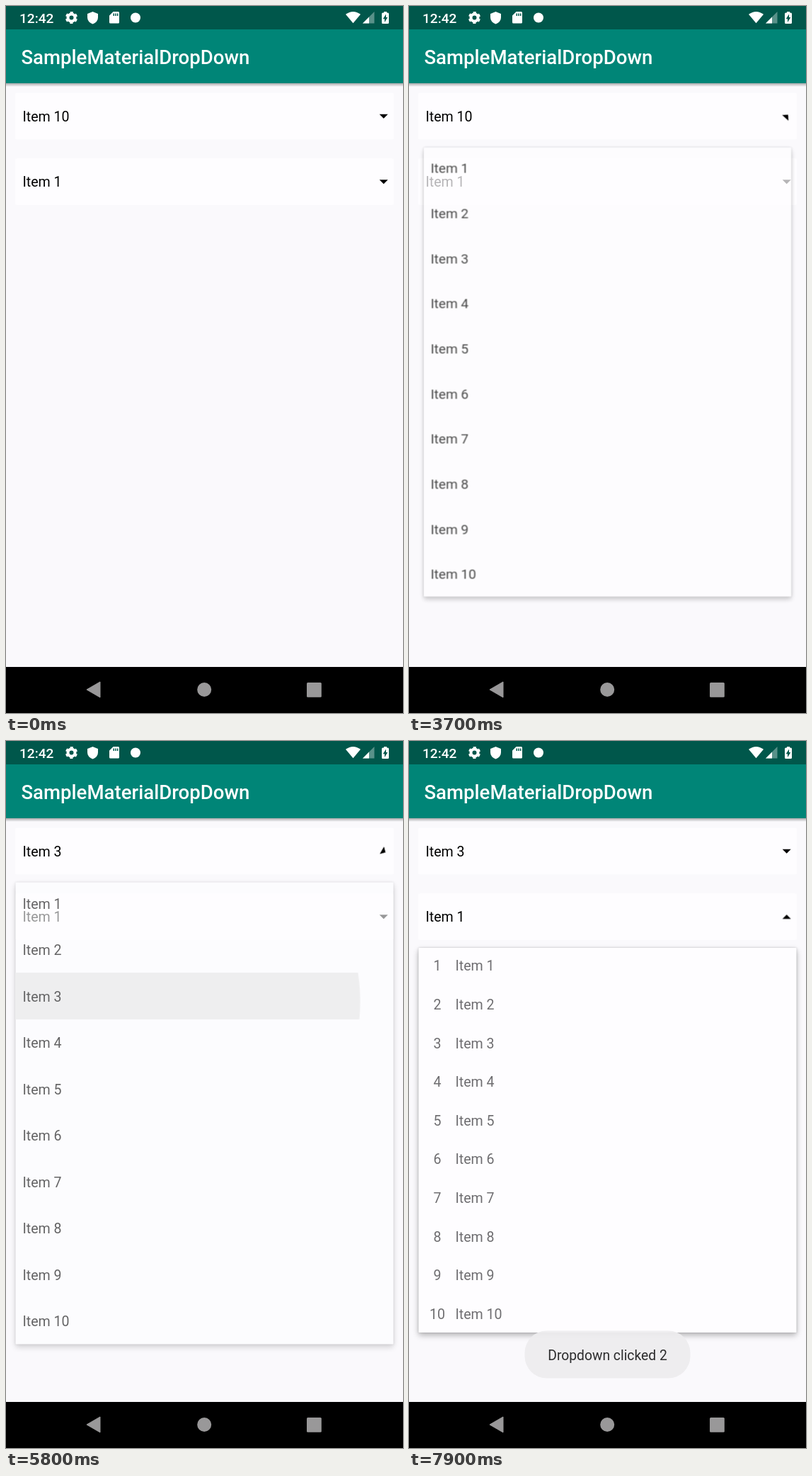
These frames come from a looping animation (561 by 998 pixels, 8000 ms). An HTML page:

```html
<!DOCTYPE html>
<html lang="en">
<head>
<meta charset="utf-8">
<title>Dropdown demo</title>
<style>
html, body { margin: 0; width: 100%; height: 100%; overflow: hidden; background: #faf9fc; }
svg { display: block; width: 100vw; height: 100vh; font: 19.6px Roboto, sans-serif; }
.title { font-size: 27.6px; font-weight: 500; fill: #fff; }
.clock { font-size: 19.1px; font-weight: 500; fill: #fff; }
.surface { fill: #fefdff; }
.shadow { filter: drop-shadow(0 4px 4px rgba(0,0,0,.24)) drop-shadow(0 0 1.5px rgba(0,0,0,.2)); }
.numbered { fill: #6f6e71; }
.toast { font-size: 19.3px; }

/* 8 s loop: every 100 ms is 1.25 % */
.anim { animation: 8s step-end infinite; }
.arrow { transform-box: fill-box; transform-origin: center; }
#arrow1 { animation-name: arrow1; }
#arrow2 { animation-name: arrow2; }
#popup1 { animation-name: popup1; transform-origin: 280.5px 199.5px; }
#popup2 { animation-name: popup2; transform-origin: 280.5px 292px; }
#before { animation-name: before; }
#after { animation-name: after; }
#ripple { animation-name: ripple; transform-origin: 230.5px 368px; }
#toast { animation-name: toast; }

@keyframes arrow1 {
  0% { transform: none; }
  46.25% { transform: rotate(-138deg); }
  47.5% { transform: rotate(-177deg); }
  48.75% { transform: rotate(-180deg); }
  72.5% { transform: rotate(-60deg); }
  73.75%, 100% { transform: none; }
}
@keyframes arrow2 {
  0% { transform: none; }
  90% { transform: rotate(-138deg); }
  91.25% { transform: rotate(-177deg); }
  92.5%, 100% { transform: rotate(-180deg); }
}
@keyframes popup1 {
  0% { opacity: 0; transform: none; }
  46.25% { opacity: .72; transform: scale(.9725); }
  47.5% { opacity: .98; transform: scale(.998); }
  48.75% { opacity: 1; transform: none; }
  72.5% { opacity: .6; }
  73.75%, 100% { opacity: 0; transform: none; }
}
@keyframes popup2 {
  0% { opacity: 0; transform: none; }
  90% { opacity: .72; transform: scale(.9725); }
  91.25% { opacity: .98; transform: scale(.998); }
  92.5%, 100% { opacity: 1; transform: none; }
}
@keyframes before { 0% { opacity: 1; } 72.5%, 100% { opacity: 0; } }
@keyframes after { 0% { opacity: 0; } 72.5%, 100% { opacity: 1; } }
@keyframes ripple {
  0% { opacity: 0; transform: none; }
  71.25% { opacity: 1; transform: none; }
  72.5% { opacity: 1; transform: scale(1.5); }
  73.75%, 100% { opacity: 0; transform: none; }
}
@keyframes toast {
  0% { opacity: 0; }
  73.75% { opacity: .3; }
  75% { opacity: .6; }
  76.25% { opacity: .85; }
  77.5% { opacity: 1; }
  98.75%, 100% { opacity: .94; }
}
</style>
</head>
<body>
<svg viewBox="0 0 561 998" preserveAspectRatio="none">
  <defs>
    <linearGradient id="barShade" x2="0" y2="1">
      <stop stop-opacity=".32"/><stop offset="1" stop-opacity="0"/>
    </linearGradient>
    <clipPath id="row"><path d="M13.5 327.5h534v65.5h-534z"/></clipPath>
  </defs>

  <rect width="561" height="998" fill="#faf9fc"/>
  <rect y="109" width="561" height="5" fill="url(#barShade)"/>
  <rect y="33" width="561" height="76" fill="#008577"/>
  <rect width="561" height="33" fill="#00574b"/>
  <text class="title" x="21.4" y="81.5">SampleMaterialDropDown</text>

  <!-- status bar -->
  <text class="clock" x="19" y="23.8">12:42</text>
  <g fill="#fff">
    <g fill="none" stroke="#fff">
      <circle cx="92.5" cy="16.5" r="5" stroke-width="4"/>
      <circle cx="92.5" cy="16.5" r="7.4" stroke-width="2.4" stroke-dasharray="4.1 3.65" stroke-dashoffset="-1.82"/>
    </g>
    <path d="M122.5 8l7.5 3v5q0 6.500-7.500 9.500q-7.500-3-7.500-9.500v-5z"/>
    <path fill-rule="evenodd" d="M151.500 8h7q1.500 0 1.500 1.500v13.500q0 1.500-1.500 1.500h-11q-1.500 0-1.500-1.500v-9.500zM151.500 10.500v3.500h1.500v-3.500zM154.200 10.500v3.500h1.500v-3.500zM156.900 10.500v3.500h1.500v-3.500z"/>
    <circle cx="183" cy="16.500" r="7"/>
    <path d="M480 11.800q10.500-7.600 21 0l-10.500 12.400z"/>
    <path d="M520.500 8v16.500h-16.500z" opacity=".35"/>
    <path d="M513 15.500v9h-9z"/>
    <path fill-rule="evenodd" d="M534 8v1.500h-1.500q-1.500 0-1.500 1.500v12.500q0 1.500 1.500 1.500h7q1.500 0 1.500-1.500v-12.500q0-1.500-1.500-1.500h-1.500v-1.500zM537 11.500v4.500h2.300l-4.300 7v-4.800h-2.300z"/>
  </g>

  <!-- spinners -->
  <rect class="surface" x="13" y="122.500" width="535" height="66" rx="3"/>
  <rect class="surface" x="13" y="215" width="535" height="66" rx="3"/>
  <text class="anim" id="before" x="23.400" y="162.800">Item 10</text>
  <text class="anim" id="after" x="23.400" y="162.800">Item 3</text>
  <text x="23.400" y="255.200">Item 1</text>
  <path class="anim arrow" id="arrow1" d="M527.700 152.700h12l-6 6z"/>
  <path class="anim arrow" id="arrow2" d="M527.700 245.200h12l-6 6z"/>

  <g class="anim" id="popup1">
    <rect class="surface shadow" x="13.500" y="199.500" width="534" height="652" rx="1"/>
    <g clip-path="url(#row)">
      <circle class="anim" id="ripple" cx="230.500" cy="368" r="180" fill="#e7e7e7"/>
    </g>
    <g id="plainRows"></g>
  </g>
  <g class="anim" id="popup2">
    <rect class="surface shadow" x="13.500" y="292" width="534" height="543" rx="1"/>
    <g id="numberedRows" class="numbered"></g>
  </g>

  <g class="anim" id="toast">
    <rect x="163.500" y="832.500" width="234" height="67" rx="31" fill="#eeedef"/>
    <text class="toast" x="280.500" y="873.600" text-anchor="middle" fill="#1f1f20">Dropdown clicked 2</text>
  </g>

  <!-- navigation bar -->
  <rect y="933" width="561" height="65"/>
  <g fill="#999899">
    <path d="M114 965l19-11v22z" stroke="#999899" stroke-linejoin="round"/>
    <circle cx="280.200" cy="965" r="10"/>
    <rect x="425" y="955" width="20.800" height="20.800" rx="1.500"/>
  </g>
</svg>
<script>
function addText(parent, text, x, y, anchor = 'start') {
  const node = document.createElementNS('http://www.w3.org/2000/svg', 'text');
  node.setAttribute('x', x);
  node.setAttribute('y', y);
  node.setAttribute('text-anchor', anchor);
  node.textContent = text;
  parent.append(node);
}
const plainRows = document.getElementById('plainRows');
const numberedRows = document.getElementById('numberedRows');
for (let i = 0; i < 10; i++) {
  const label = `Item ${i + 1}`;
  addText(plainRows, label, 23.4, 236.7 + 65.5 * i);
  addText(numberedRows, i + 1, 40, 324.3 + 54.6 * i, 'middle');
  addText(numberedRows, label, 65.4, 324.3 + 54.6 * i);
}
</script>
</body>
</html>
```
